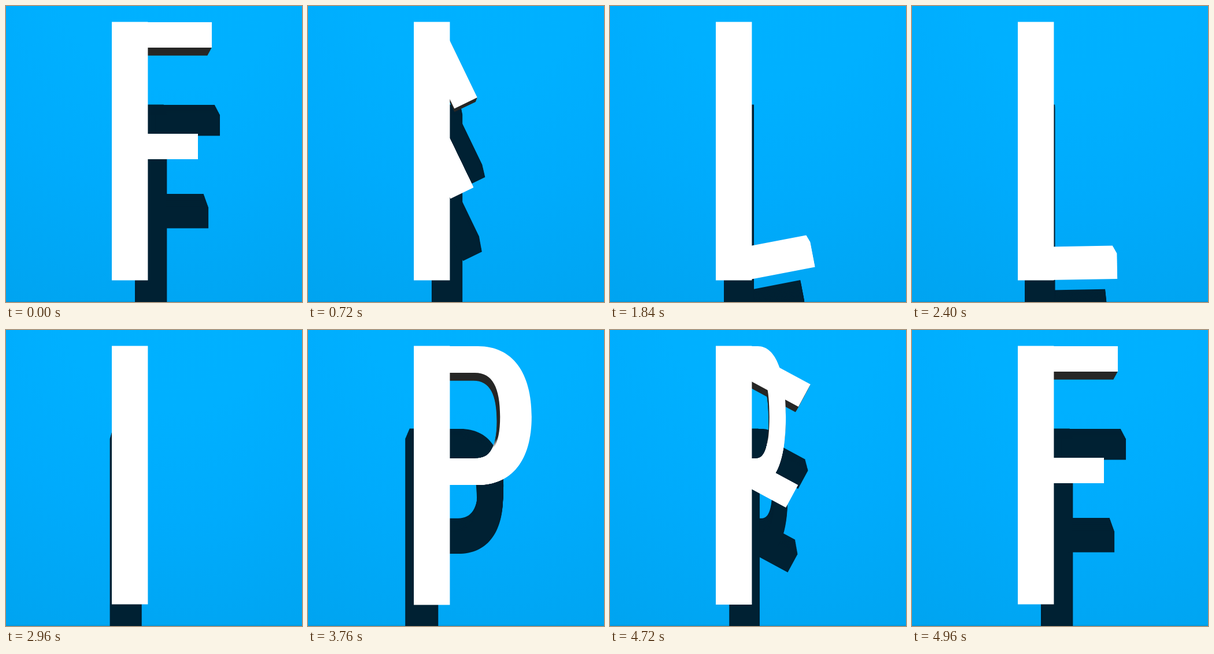
An HTML page with a canvas for the animation above (5.04 s loop, 512 by 512 pixels).

```html
<!DOCTYPE html>
<html lang="en">
<head>
<meta charset="utf-8">
<title>Folding letters</title>
<style>
  html, body { margin: 0; width: 100%; height: 100%; overflow: hidden; }
  body { background: radial-gradient(circle at 290px -60px, #00b1ff 0, #00b0ff 200px, #00abfc 390px, #00a4f0 640px); }
  body::before { content: ""; position: fixed; left: 0; right: 0; bottom: 0; height: 2px; background: #0598dd; }
  canvas { position: fixed; left: 0; top: 0; }
  #shade { filter: blur(.6px); }
</style>
</head>
<body>
<canvas id="shade" width="512" height="512"></canvas>
<canvas id="letter" width="512" height="512"></canvas>
<script>
const LOOP = 5040, STEP = 80, LAYERS = 16;
const shade = document.getElementById('shade').getContext('2d');
const letter = document.getElementById('letter').getContext('2d');

const rect = (x, y, right, bottom) => {
  const p = new Path2D();
  p.rect(x, y, right - x, bottom - y);
  return p;
};
const upperArm = rect(221, 28, 356, 72);
const lowerArm = rect(235, 221, 332, 265);
const foot = rect(237, 429.5, 355, 474);
const bowl = new Path2D(
  'M230 28H302C368 28 404 74 404 150C404 226 366 268 302 268H230' +
  'V222H296C328 222 344 200 344 150C344 100 330 74 296 74H230Z');

// Sides facing down are dark, sides facing up are lit.
const sideFill = letter.createLinearGradient(0, 185, 0, 202);
sideFill.addColorStop(0, '#262625');
sideFill.addColorStop(1, '#fff');

const mix = (a, b, k) => a + (b - a) * k;

function ease(t, start, end) {
  const k = Math.min(1, Math.max(0, (t - start) / (end - start)));
  return k < .5 ? 2 * k * k : 1 - 2 * (1 - k) ** 2;
}

function turned(path, x, y, degrees) {
  const out = new Path2D();
  out.addPath(path, new DOMMatrix().translate(x, y).rotate(degrees).translate(-x, -y));
  return out;
}

function squeezed(path, x, amount) {
  const out = new Path2D();
  out.addPath(path, new DOMMatrix().translate(x, 0).scale(amount, 1).translate(-x, 0));
  return out;
}

function draw(t) {
  const a = ease(t, 260, 1000);
  const b = ease(t, 1350, 2000);
  const c = ease(t, 2355, 2960);
  const d = ease(t, 3350, 4000);
  const e = ease(t, 4355, 4960);
  const armsOpen = 1 - a + e, footOpen = b - c, bowlOpen = d - e;
  const light = (a + b + c + d) / 4 - e;

  const parts = [];
  if (armsOpen > 0) {
    const angle = 90 * (1 - armsOpen);
    parts.push(turned(upperArm, 220.6, 42.8, angle), turned(lowerArm, 235, 231, angle));
  }
  if (footOpen > 0) parts.push(turned(foot, 237, 465, -90 * (1 - footOpen)));
  if (bowlOpen > 0) parts.push(squeezed(bowl, 214, Math.sin(bowlOpen * Math.PI / 2)));
  const stem = rect(183, 27.5, 245.4, 474.5 + 1.5 * bowlOpen);

  // The cast shadow sweeps from the back face to the front face.
  shade.setTransform(1, 0, 0, 1, 0, 0);
  shade.clearRect(0, 0, 512, 512);
  shade.fillStyle = '#002133';
  for (let i = 0; i <= LAYERS; i++) {
    const k = i / LAYERS, s = mix(.798, .829, k);
    const left = mix(223 - 51 * light, 226.6 - 62.6 * light, k);
    const top = mix(171, 188, k);
    shade.setTransform(s, 0, 0, s, left - 183 * s, top - 28 * s);
    for (const p of [stem, ...parts]) shade.fill(p);
  }

  letter.setTransform(1, 0, 0, 1, 0, 0);
  letter.clearRect(0, 0, 512, 512);
  letter.fillStyle = sideFill;
  for (let i = LAYERS; i > 0; i--) {
    const s = 1 - .075 * i / LAYERS, o = 256 * (1 - s);
    letter.setTransform(s, 0, 0, s, o, o);
    for (const p of parts) letter.fill(p);
  }
  letter.setTransform(1, 0, 0, 1, 0, 0);
  letter.fillStyle = '#fff';
  for (const p of [...parts, stem]) letter.fill(p);
}

const origin = performance.now();
function tick() {
  const t = (performance.now() - origin) % LOOP;
  draw(Math.floor(t / STEP) * STEP);
  requestAnimationFrame(tick);
}
tick();
</script>
</body>
</html>
```
